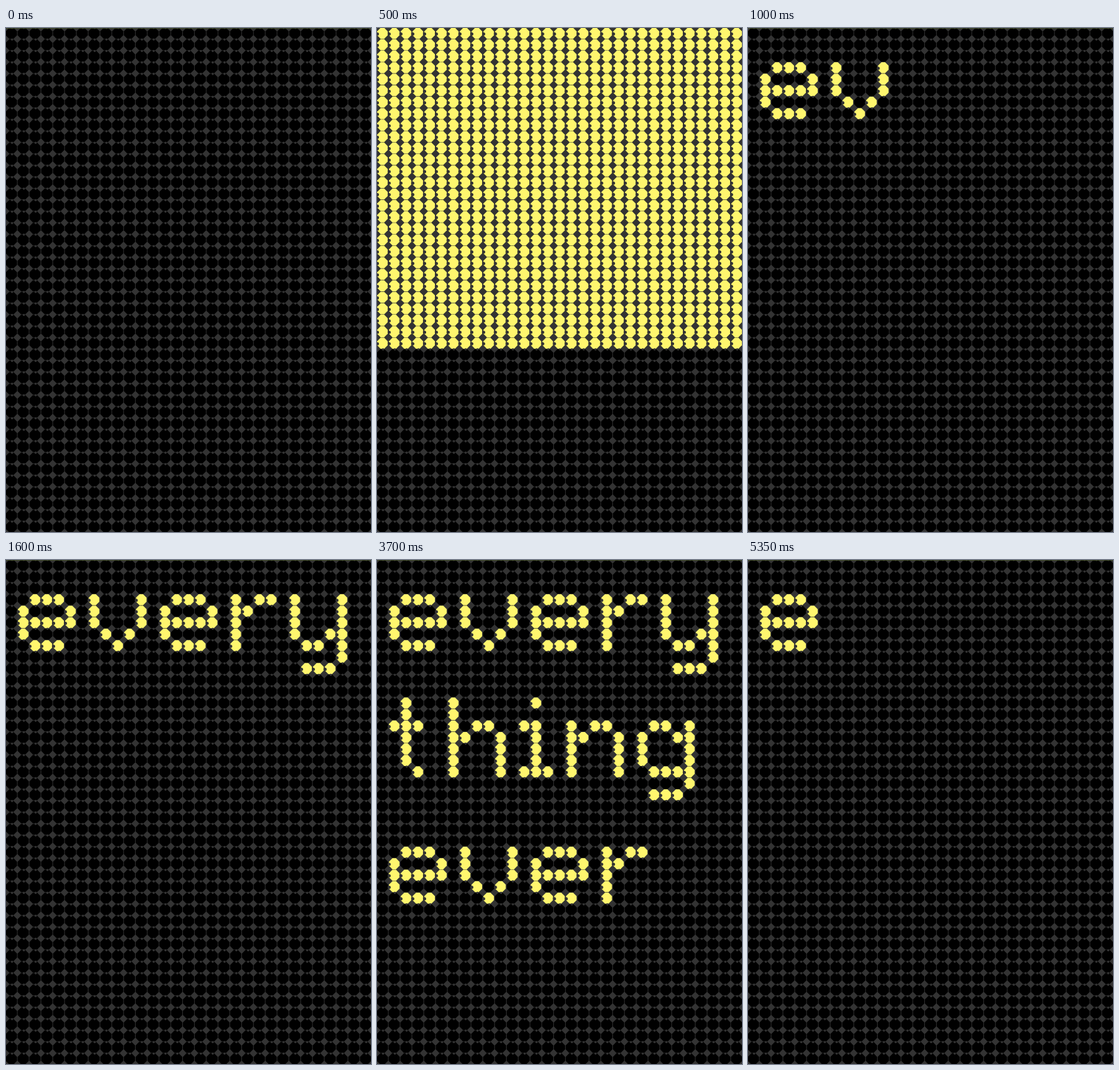
Recreate the animation shown at these times as an HTML page with a canvas. Size 580 by 800 pixels, loop 5550 ms.

```html
<!DOCTYPE html>
<html lang="en">
<head>
<meta charset="utf-8">
<title>Flip-dot board</title>
<style>
  html, body { margin: 0; width: 100%; height: 100%; overflow: hidden; background: #333; }
  canvas { display: block; width: 580px; height: 800px; }
</style>
</head>
<body>
<canvas id="board" width="580" height="800"></canvas>
<script>
const LOOP = 5550, COLS = 31, ROWS = 44;
const WIPE_END = 1000, LAST_START = 5350, LETTER_MS = 200;
const GRID = '#333', DARK = '#000', LIT = '#fff66e', EDGE = '#454f2b';

// Rows run from the ascender line down, separated by slashes.
const GLYPHS = {
  e: '//.###./#...#/#####/#..../.###.',
  v: '//#...#/#...#/#...#/.#.#./..#..',
  r: '//#.##/##../#.../#.../#...',
  y: '//#...#/#...#/#...#/#..##/.##.#/....#/.###.',
  t: '.#./.#./###/.#./.#./.#./..#',
  h: '#/#/#.##./##..#/#...#/#...#/#...#',
  i: '.#.//##./.#./.#./.#./###',
  n: '//#.##./##..#/#...#/#...#/#...#',
  g: '//.##.#/#..##/#...#/#...#/.####/....#/.###.',
  m: '//##.#./#.#.#/#.#.#/#...#/#...#'
};

const LINES = [
  { word: 'every', cols: [1, 7, 13, 19, 24], row: 1, start: 800 },
  { word: 'thing', cols: [1, 6, 12, 16, 22], row: 12, start: 1950 },
  { word: 'every', cols: [1, 7, 13, 19, 24], row: 23, start: 3100 },
  { word: 'time', cols: [1, 5, 9, 15], row: 34, start: 4250 }
];

const ctx = document.getElementById('board').getContext('2d');

function octagon(x, y, w, h, cut) {
  ctx.beginPath();
  ctx.moveTo(x - w + cut, y - h);
  ctx.lineTo(x + w - cut, y - h);
  ctx.lineTo(x + w, y - h + cut);
  ctx.lineTo(x + w, y + h - cut);
  ctx.lineTo(x + w - cut, y + h);
  ctx.lineTo(x - w + cut, y + h);
  ctx.lineTo(x - w, y + h - cut);
  ctx.lineTo(x - w, y - h + cut);
  ctx.fill();
}

function notch(x, y, r) {
  ctx.fillStyle = GRID;
  ctx.beginPath();
  ctx.arc(x, y, r, 0, 2 * Math.PI);
  ctx.fill();
}

// Discs flip about a diagonal, so the notch moves from the top to the left.
function drawDot(col, row, lit) {
  const x = 8.6 + col * 18.76, y = 8.4 + row * 18.22;
  ctx.fillStyle = lit ? LIT : DARK;
  octagon(x, y, lit ? 8.4 : 8.9, 8.8, 5.6);
  if (lit) notch(x - 8, y + 1, 2.5);
  else notch(x + 1, y - 8.4, 1.8);
}

function typedDots(time) {
  const dots = new Set();
  const addGlyph = (char, col, row) =>
    GLYPHS[char].split('/').forEach((bits, dy) =>
      [...bits].forEach((bit, dx) => bit === '#' && dots.add((row + dy) * COLS + col + dx)));
  for (const { word, cols, row, start } of LINES) {
    const shown = Math.floor((time - start) / LETTER_MS) + 1;
    cols.forEach((col, i) => i < shown && addGlyph(word[i], col, row));
  }
  return dots;
}

function draw(time) {
  const wiping = time < WIPE_END;
  const step = Math.floor(time / 100);
  const filled = wiping ? Math.round(step * (6.5 - 0.18 * step)) : 0;
  // the closing pose is the first letter alone
  const dots = wiping ? new Set() : typedDots(time < LAST_START ? time : LINES[0].start);
  ctx.fillStyle = GRID;
  ctx.fillRect(0, 0, 580, 800);
  for (let row = 0; row < ROWS; row++)
    for (let col = 0; col < COLS; col++)
      drawDot(col, row, row < filled || dots.has(row * COLS + col));
  if (!filled) {
    ctx.fillStyle = EDGE;
    ctx.fillRect(0, 0, 580, 1);
  }
}

let lastTick = -1;
const origin = performance.now();

function frame() {
  const time = (performance.now() - origin) % LOOP;
  const tick = Math.floor(time / 50);
  if (tick !== lastTick) {
    draw(tick * 50);
    lastTick = tick;
  }
  requestAnimationFrame(frame);
}
frame();
</script>
</body>
</html>
```
